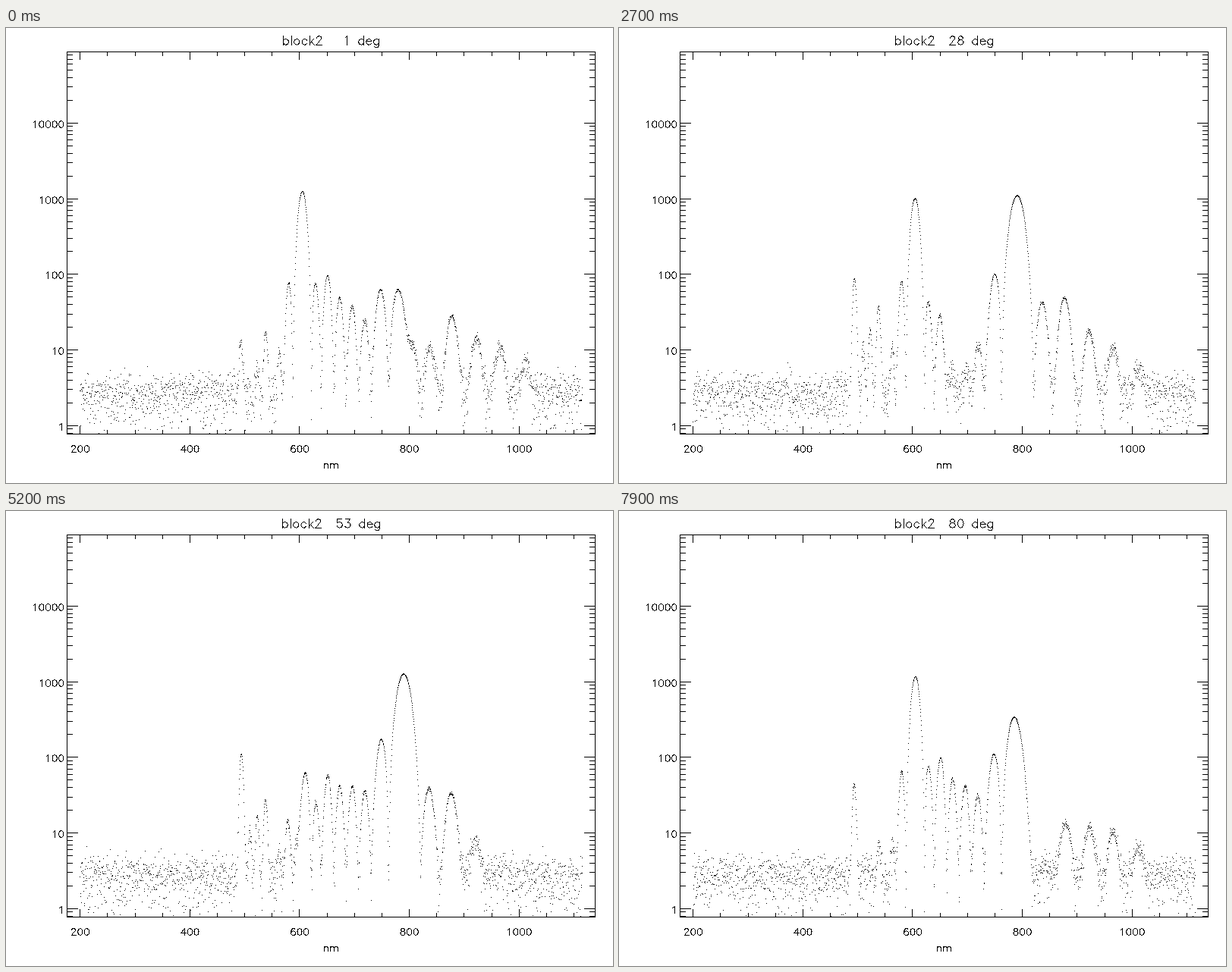
Write a matplotlib script that moves like this. It is 800x600 px and loops after 8 s.

```python
import numpy as np
import matplotlib.pyplot as plt
from matplotlib.animation import FuncAnimation

W, H, DPI = 800, 600, 100
LEFT, RIGHT, TOP, BOTTOM = 80, 776, 31, 535
FRAMES, STEP_MS = 80, 100
FLOOR, NOISE, LEAK = 2.5, 1.15, 0.012
WAVES = np.linspace(200, 1115.6, 2048)


def to_x(nm):
    return 97.3 + (nm - 200) * 0.723


def to_y(counts):
    return 523.9 - 99.75 * np.log10(counts)


# --- single-stroke lettering, 21 units cap height ---

def arc(cx, cy, rx, ry, a=0, b=360):
    t = np.radians(np.linspace(a, b, 25))
    return list(zip(cx + rx * np.cos(t), cy + ry * np.sin(t)))


def bowl(a=0, b=360):
    return arc(9.5, 7, 6.5, 7, a, b)


def arch(x):
    return arc(x + 5.5, 8.5, 5.5, 5.5, 165, 0) + [(x + 11, 0)]


def stem(x, top, bottom=0):
    return [(x, top), (x, bottom)]


HOOK = arc(10, 7, 7, 7, 130, -155)
GLYPHS = {
    " ": (16, []),
    "0": (20, [arc(10, 10.5, 7, 10.5)]),
    "1": (20, [[(6, 17), (11, 21), (11, 0)]]),
    "2": (20, [arc(10, 16, 6, 5, 175, -30) + [(3, 0), (17, 0)]]),
    "3": (20, [[(5, 21), (16, 21), (10, 13)] + arc(10, 6.5, 7, 6.5, 90, -155)]),
    "4": (20, [[(13, 0), (13, 21), (3, 7), (18, 7)]]),
    "5": (20, [[(15, 21), (5, 21), (4, 12)] + HOOK]),
    "6": (20, [arc(11, 10, 7, 11, 50, 180), arc(10.5, 6.5, 6.5, 6.5)]),
    "7": (20, [[(3, 21), (17, 21), (7, 0)]]),
    "8": (20, [arc(10, 16.5, 5.5, 4.5), arc(10, 6, 7, 6)]),
    "9": (20, [arc(9, 11, 7, 11, 0, -130), arc(9.5, 14.5, 6.5, 6.5)]),
    "b": (19, [stem(4, 21), bowl(148, -148)]),
    "c": (18, [bowl(32, 328)]),
    "d": (19, [stem(15, 21), bowl(32, 328)]),
    "e": (18, [[(3, 8)] + bowl(8, 328)]),
    "g": (19, [stem(15, 14, -2) + arc(9.5, -2, 5.5, 5, 0, -140), bowl(32, 328)]),
    "k": (17, [stem(4, 21), [(14, 14), (4, 4)], [(8, 8), (15, 0)]]),
    "l": (8, [stem(4, 21)]),
    "m": (30, [stem(4, 14), arch(4), arch(15)]),
    "n": (19, [stem(4, 14), arch(4)]),
    "o": (19, [bowl()]),
}


def ink(canvas, x, y):
    canvas[np.rint(y).astype(int), np.rint(x).astype(int)] = 0


def stroke(canvas, points):
    """One-pixel polyline."""
    for (x0, y0), (x1, y1) in zip(points, points[1:]):
        n = int(np.ceil(max(abs(x1 - x0), abs(y1 - y0)))) + 1
        ink(canvas, np.linspace(x0, x1, n), np.linspace(y0, y1, n))


def text(canvas, string, x, base, scale=0.43, align=0.5):
    """Align 0.5 centres the string on x, 1 ends it at x."""
    x -= align * scale * sum(GLYPHS[c][0] for c in string)
    for c in string:
        width, strokes = GLYPHS[c]
        for points in strokes:
            stroke(canvas, [(x + scale * u, base - scale * v) for u, v in points])
        x += scale * width


def draw_axes(canvas):
    stroke(canvas, [(LEFT, TOP), (RIGHT, TOP), (RIGHT, BOTTOM),
                    (LEFT, BOTTOM), (LEFT, TOP)])
    for nm in range(200, 1101, 50):
        x, major = to_x(nm), nm % 200 == 0
        size = 10 if major else 5
        stroke(canvas, [(x, TOP), (x, TOP + size)])
        stroke(canvas, [(x, BOTTOM), (x, BOTTOM - size)])
        if major:
            text(canvas, str(nm), x, 559)
    for power in range(-1, 5):
        for digit in range(1, 10):
            y = to_y(digit * 10.0 ** power)
            if not TOP < y < BOTTOM:
                continue
            size = 14 if digit == 1 else 7
            stroke(canvas, [(LEFT, y), (LEFT + size, y)])
            stroke(canvas, [(RIGHT, y), (RIGHT - size, y)])
            if digit == 1:
                text(canvas, str(10 ** power), 76.5, round(y) + 6, align=1)
    text(canvas, "nm", 428, 580)


# --- spectrum: fixed lobes seen through a wavelength-dependent rotation ---

# wavelength of each lobe and its strongest count
LOBES = {494: 108, 510: 9, 523: 17, 538: 34, 563: 9, 580: 83, 605: 1250,
         629: 72, 651: 95, 673: 50, 696: 42, 719: 34, 749: 168, 790: 1280,
         836: 42, 877: 46, 922: 15, 965: 9, 1012: 4}


def lobe_field():
    """Neighbouring lobes have opposite signs, which makes the dark gaps."""
    field, sign = np.zeros_like(WAVES), 1
    for centre, peak in LOBES.items():
        half = 10.8 * (centre / 580) ** 2 * (peak / 40) ** 0.17
        u = np.clip((WAVES - centre) / half, -1, 1)
        field += sign * np.sqrt(peak) * np.cos(np.pi / 2 * u) ** 2
        sign = -sign
    return field


POWER = lobe_field() ** 2
BRIGHTEST = 9430 / np.sqrt(WAVES) - 375.5


def samples(deg):
    swing = np.tanh(1.5 * np.cos(np.radians(2.1 * (deg - BRIGHTEST)))) / np.tanh(1.5)
    noise = np.random.default_rng(deg).normal(0, NOISE, WAVES.size)
    counts = FLOOR + POWER * (swing ** 2 + LEAK) + noise
    seen = counts > 0.78
    return to_x(WAVES[seen]), to_y(counts[seen])


# --- drawing ---

fig = plt.figure(figsize=(W / DPI, H / DPI), dpi=DPI, facecolor="white")
ax = fig.add_axes([0, 0, 1, 1])
ax.axis("off")

paper = np.ones((H, W))
draw_axes(paper)
picture = ax.imshow(paper, cmap="gray", vmin=0, vmax=1,
                    interpolation="nearest", aspect="auto")


def update(frame):
    deg = frame + 1
    canvas = paper.copy()
    text(canvas, f"block2 {deg:3d} deg", 428, 21.6, scale=0.5375)
    ink(canvas, *samples(deg))
    picture.set_data(canvas)
    return [picture]


anim = FuncAnimation(fig, update, frames=FRAMES, interval=STEP_MS,
                     repeat=True, repeat_delay=0)
plt.show()
```
